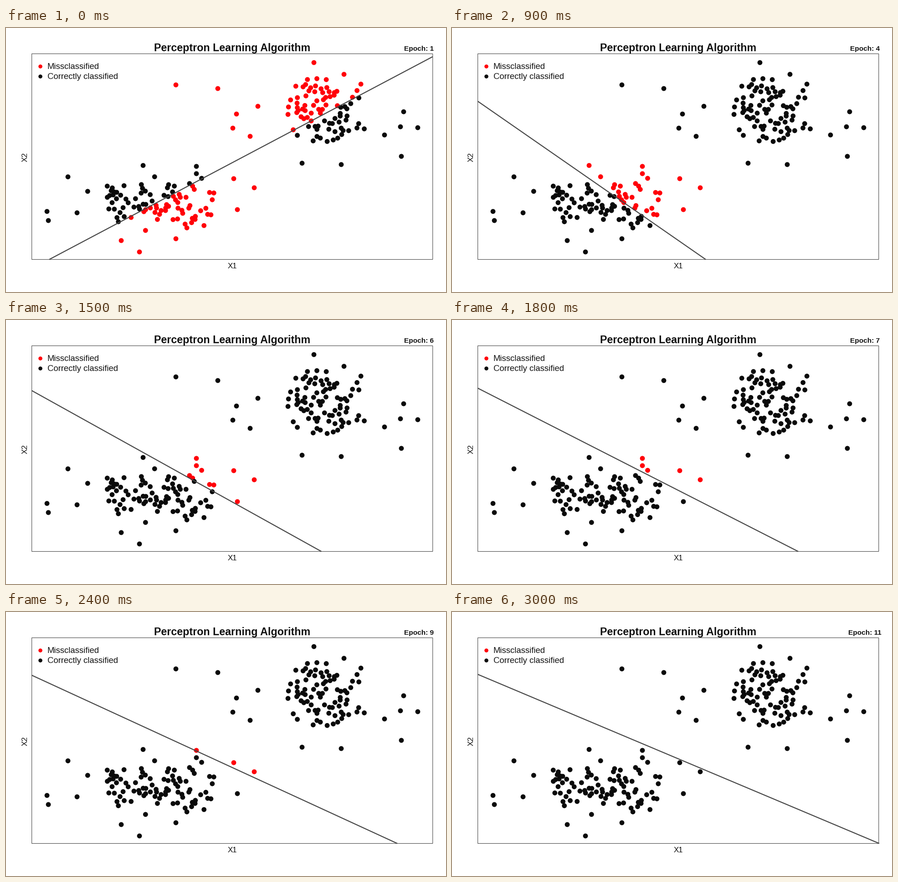
Animation, 966 px wide and 580 px high, one loop 3600 ms. Source, as a matplotlib script:

```python
import numpy as np
import matplotlib.pyplot as plt
from matplotlib.animation import FuncAnimation
from matplotlib.patches import Rectangle

W, H, DPI = 966, 580, 100
PX = 72 / DPI
LEFT, TOP, RIGHT, BOTTOM = 56.6, 56.6, 936.8, 508.5
RED, BLACK, GREY = "#ff0008", "#0a0a0a", "#454545"
EPOCHS = 11

# A few outliers that give each cluster its outline
UPPER_RIM = [
    (373, 125), (465, 133), (506, 189), (553, 172), (498, 220), (536, 238),
    (676, 76), (873, 184), (866, 217), (904, 219), (868, 282), (831, 235),
    (650, 297), (736, 300),
]
LOWER_RIM = [
    (90, 403), (93, 423), (136, 327), (156, 406), (301, 302), (418, 304),
    (418, 320), (500, 331), (545, 351), (508, 399), (253, 467), (293, 492),
    (373, 463),
]

rng = np.random.default_rng(21)


def boundary_at(epoch):
    """End points x0, y0, x1, y1 of the line; it eases flat after a flip."""
    if epoch == 1:
        return 95, BOTTOM, RIGHT, 63
    y0 = np.interp(epoch, [2, 4, 5, 9, 11], [175, 161, 160.5, 139, 137])
    x1 = np.interp(epoch, [2, 4, 7, 9, 11], [493, 557, 760, 859, 938])
    return LEFT, y0, x1, BOTTOM


def offset(x, y, epoch):
    """Vertical distance below the boundary, positive downwards."""
    x0, y0, x1, y1 = boundary_at(epoch)
    return y - (y0 + (x - x0) * (y1 - y0) / (x1 - x0))


def cluster(rim, total, centre, spread, side, reach=1.9, gap=5.5):
    """Grow the rim to a full cluster on one side of a late boundary."""
    points = list(rim)
    while len(points) < total:
        z = rng.normal(size=2)
        x, y = centre + z * spread
        if np.hypot(*z) > reach or side * offset(x, y, 9) < 2:
            continue
        if min(np.hypot(x - px, y - py) for px, py in points) > gap:
            points.append((x, y))
    return points


upper = cluster(UPPER_RIM, 97, (698, 178), (57, 45), -1)
lower = cluster(LOWER_RIM, 100, (329, 383), (86, 37), 1)
xs, ys = np.array(upper + lower).T
label = np.repeat([1, -1], [len(upper), len(lower)])

fig = plt.figure(figsize=(W / DPI, H / DPI), dpi=DPI, facecolor="white")
ax = fig.add_axes([0, 0, 1, 1])
ax.set_xlim(0, W)
ax.set_ylim(H, 0)
ax.axis("off")


def text(x, y, s, size, **kw):
    kw = {"ha": "center", "va": "baseline", **kw}
    return ax.text(x, y, s, fontsize=size * PX, color="#111111",
                   family="Liberation Sans", **kw)


def dots(x, y, diameter, colour):
    return ax.scatter(x, y, s=(diameter * PX) ** 2, c=colour,
                      linewidths=0, zorder=2)


ax.add_patch(Rectangle((LEFT, TOP), RIGHT - LEFT, BOTTOM - TOP, fill=False,
                       edgecolor=GREY, linewidth=1.1 * PX, snap=False,
                       zorder=4))
text(496.5, 50.5, "Perceptron Learning Algorithm", 23.2, weight="bold")
text(496.5, 528, "X1", 16.9)
text(47, 283.5, "X2", 16.9, rotation=90, rotation_mode="anchor")
for y, name, colour in [(84, "Missclassified", RED),
                        (106, "Correctly classified", BLACK)]:
    dots([75], [y], 8.6, colour)
    text(91, y + 6.4, name, 18.5, ha="left")

epoch_text = text(906.5, 49.7, "", 15.4, weight="bold")
cloud = dots(xs, ys, 10.8, BLACK)
boundary, = ax.plot([], [], color=GREY, linewidth=2.2 * PX, zorder=3,
                    solid_capstyle="butt")


def update(frame):
    epoch = min(frame + 1, EPOCHS)
    # The first guess has its two sides swapped
    sign = -1 if epoch == 1 else 1
    wrong = label * sign * offset(xs, ys, epoch) > 0
    cloud.set_facecolors(np.where(wrong, RED, BLACK))
    line = boundary_at(epoch)
    boundary.set_data(line[::2], line[1::2])
    epoch_text.set_text(f"Epoch: {epoch}")
    return cloud, boundary, epoch_text


anim = FuncAnimation(fig, update, frames=EPOCHS + 1, interval=300,
                     repeat=True, repeat_delay=0)
plt.show()
```
